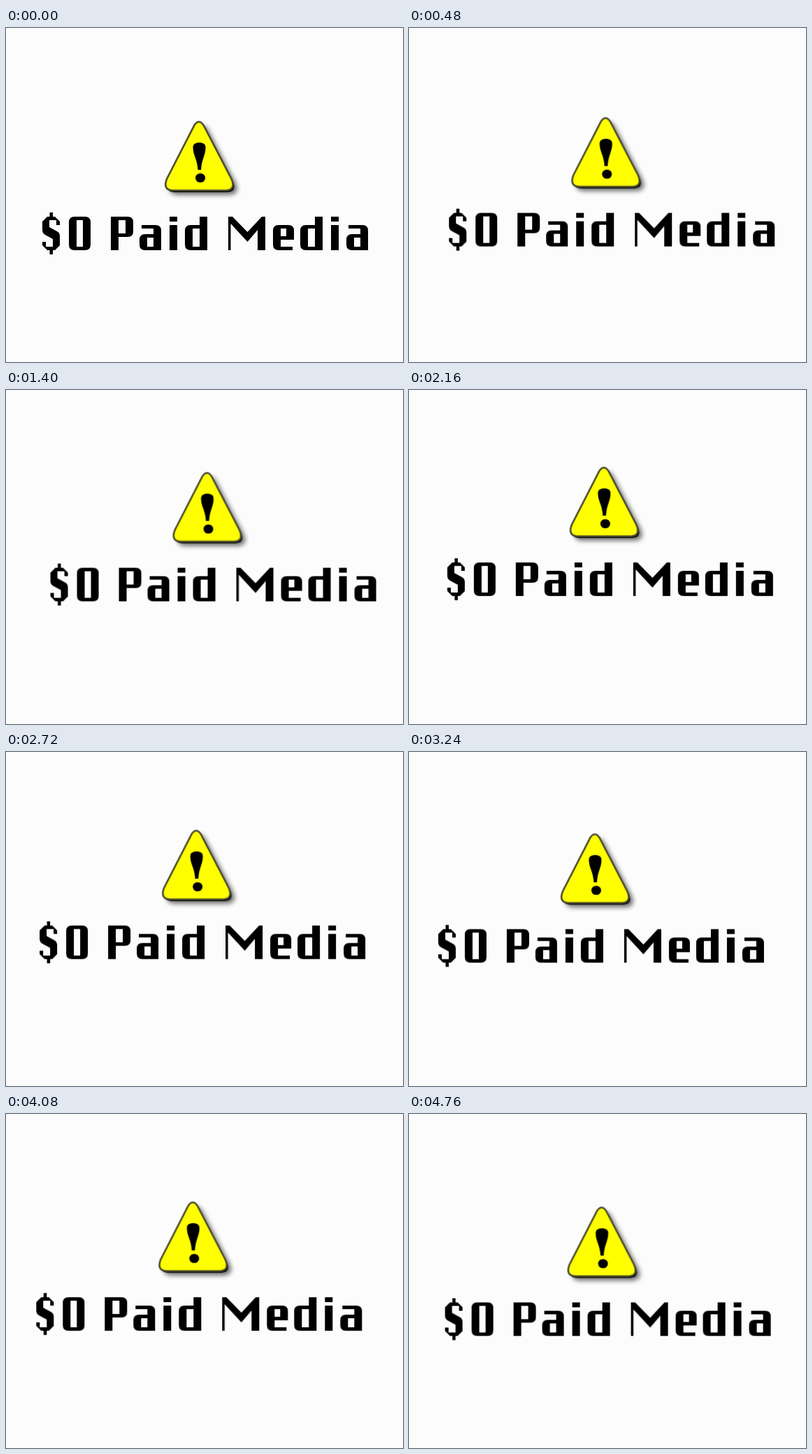
Recreate the animation shown at these times as an HTML page. Size 568 by 478 pixels, loop 4800 ms.

```html
<!DOCTYPE html>
<html lang="en">
<head>
<meta charset="utf-8">
<title>$0 Paid Media</title>
<style>
  html, body { margin: 0; width: 100%; height: 100%; overflow: hidden; background: #fcfcfc; }
  svg { display: block; width: 568px; height: 478px; }
  .drift { animation: drift 4800ms linear infinite; }
  .label { font: bold 62px "DejaVu Sans Mono", monospace; fill: transparent; }
  .shadow { fill: #000; opacity: .6; filter: blur(3.5px); }
  .sign { filter: blur(.6px); }
  .face { fill: #ff0; stroke: #4c4c30; stroke-width: 2.6; }
  /* constant speed around a four-cornered path */
  @keyframes drift {
    0%, 100% { transform: translate(0, 0); }
    25.8333% { transform: translate(13.4px, -14px); }
    49.1667% { transform: translate(.5px, -25.2px); }
    75% { transform: translate(-14.5px, -13px); }
  }
</style>
</head>
<body>
<svg viewBox="0 0 568 478" role="img" aria-label="$0 Paid Media">
  <defs>
    <path id="tri" d="M269.500 139Q276 129.500 282.500 139L322.500 216Q329 231.500 315 232.500H238Q224 231.500 230 216Z"/>
    <path id="a" d="M3 282H23Q31 282 31 290V318H8Q0 318 0 310V303Q0 295 8 295H20V287H3ZM11 300V313H20V300Z"/>
    <path id="i" d="M0 270H11V277H0ZM0 282H11V318H0Z"/>
    <path id="d" d="M21 270H32V318H8Q0 318 0 310V290Q0 282 8 282H21ZM11 287V313H21V287Z"/>
    <path id="e" d="M8 282H22Q30 282 30 290V303H11V313H28V318H8Q0 318 0 310V290Q0 282 8 282ZM11 287V298H19V287Z"/>
  </defs>
  <g class="drift">
    <use href="#tri" class="shadow" x="6" y="6"/>
    <g class="sign">
      <use href="#tri" x="2" y="2.500"/>
      <use href="#tri" class="face"/>
      <path d="M276.500 164C282 164 285.500 166 285.500 171C285.500 182 280 187 279 203H274.500C273.500 187 267.500 182 267.500 171C267.500 166 271 164 276.500 164Z"/>
      <ellipse cx="278" cy="214.500" rx="7" ry="6.600"/>
    </g>

    <text class="label" x="52" y="318">$0 Paid Media</text>
    <g fill="#000" fill-rule="evenodd">
      <path d="M59 270H70L77 277V282H72V275H62V285L73 291Q77 293 77 298V311L70 318H59L52 311V306H57V313H67V302L56 296Q52 294 52 289V277Z"/>
      <path d="M62.500 264H67V270H62.500ZM62.500 318H67V324H62.500Z"/>
      <path d="M98 270H113Q121 270 121 278V310Q121 318 113 318H98Q90 318 90 310V278Q90 270 98 270ZM101 275V313H110V275Z"/>
      <path d="M150 270H174Q182 270 182 278V291Q182 299 174 299H161V318H150ZM161 275V294H171V275Z"/>
      <use href="#a" x="191"/>
      <use href="#i" x="234"/>
      <use href="#d" x="256"/>
      <path d="M318 270H324L345.500 292L366 270H371V318H360V289L345.500 306L321.500 280V318H318Z"/>
      <use href="#e" x="382"/>
      <use href="#d" x="421"/>
      <use href="#i" x="465"/>
      <use href="#a" x="487"/>
    </g>
  </g>
</svg>
</body>
</html>
```
